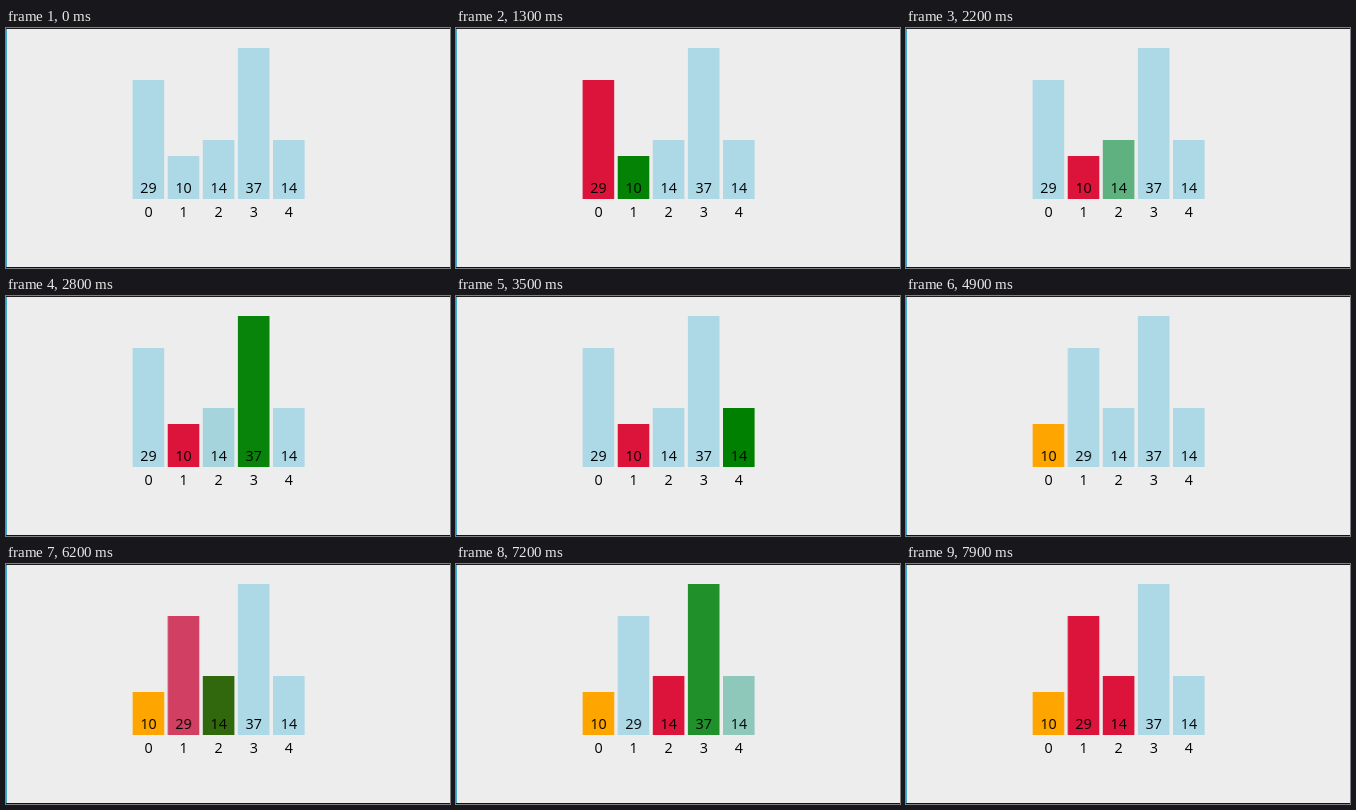
An HTML page for the animation above (8000 ms loop, 444x240 px).

```html
<!DOCTYPE html>
<html lang="en">
<head>
<meta charset="utf-8">
<title>Selection sort</title>
<style>
  :root {
    --idle: rgb(173, 216, 230);
    --min: rgb(220, 20, 60);
    --look: rgb(0, 128, 0);
    --done: rgb(255, 165, 0);
    --pitch: 35.1px;
  }
  html, body { margin: 0; width: 100%; height: 100%; overflow: hidden; background: #ededed; }
  svg { display: block; width: 444px; height: 240px; }
  text { font: 14.3px "Open Sans", "Noto Sans", sans-serif; text-anchor: middle; fill: #000; }
  .bar rect { fill: var(--idle); }
  .bar, .bar rect {
    animation: 8s cubic-bezier(.65, 0, .35, 1) infinite;
  }
  .a { transform: translateX(0); animation-name: move-a; }
  .b { transform: translateX(var(--pitch)); animation-name: move-b; }
  .c { transform: translateX(calc(2 * var(--pitch))); }
  .d { transform: translateX(calc(3 * var(--pitch))); }
  .e { transform: translateX(calc(4 * var(--pitch))); }
  .a rect { animation-name: tint-a; }
  .b rect { animation-name: tint-b; }
  .c rect { animation-name: tint-c; }
  .d rect { animation-name: tint-d; }
  .e rect { animation-name: tint-e; }

  /* One step every 6.295% of the loop, each transition 3.75% long */
  @keyframes move-a {
    0%, 50.89% { transform: translateX(0); }
    54.64%, 100% { transform: translateX(var(--pitch)); }
  }
  @keyframes move-b {
    0%, 50.89% { transform: translateX(var(--pitch)); }
    54.64%, 100% { transform: translateX(0); }
  }
  @keyframes tint-a {
    0%, 6.83% { fill: var(--idle); }
    10.58%, 19.41% { fill: var(--min); }
    23.16%, 44.6% { fill: var(--idle); }
    48.35%, 57.19% { fill: var(--min); }
    60.94%, 63.48% { fill: var(--idle); }
    67.23%, 76.07% { fill: var(--min); }
    79.82%, 94.96% { fill: var(--idle); }
    98.71%, 100% { fill: var(--min); }
  }
  @keyframes tint-b {
    0%, 13.12% { fill: var(--idle); }
    16.87%, 19.41% { fill: var(--look); }
    23.16%, 57.19% { fill: var(--min); }
    60.94%, 100% { fill: var(--done); }
  }
  @keyframes tint-c {
    0%, 25.71% { fill: var(--idle); }
    29.46%, 32.01% { fill: var(--look); }
    35.76%, 69.78% { fill: var(--idle); }
    73.53%, 76.07% { fill: var(--look); }
    79.82%, 100% { fill: var(--min); }
  }
  @keyframes tint-d {
    0%, 32.01% { fill: var(--idle); }
    35.76%, 38.3% { fill: var(--look); }
    42.05%, 82.37% { fill: var(--idle); }
    86.12%, 88.66% { fill: var(--look); }
    92.41%, 100% { fill: var(--idle); }
  }
  @keyframes tint-e {
    0%, 38.3% { fill: var(--idle); }
    42.05%, 44.6% { fill: var(--look); }
    48.35%, 88.66% { fill: var(--idle); }
    92.41%, 94.96% { fill: var(--look); }
    98.71%, 100% { fill: var(--idle); }
  }
</style>
</head>
<body>
<svg viewBox="0 0 444 240">
  <rect width="444" height="240" fill="#ededed"/>
  <rect width="1" height="240" fill="#45a9d0"/>
  <rect width="444" height="1" fill="#1c1c1c"/>
  <rect y="239" width="444" height="1" fill="#111"/>

  <g class="bar a"><rect x="126.6" y="52" width="31.6" height="119"/><text x="142.5" y="165">29</text></g>
  <g class="bar b"><rect x="126.6" y="128" width="31.6" height="43"/><text x="142.5" y="165">10</text></g>
  <g class="bar c"><rect x="126.6" y="112" width="31.6" height="59"/><text x="142.5" y="165">14</text></g>
  <g class="bar d"><rect x="126.6" y="20" width="31.6" height="151"/><text x="142.5" y="165">37</text></g>
  <g class="bar e"><rect x="126.6" y="112" width="31.6" height="59"/><text x="142.5" y="165">14</text></g>

  <text x="142.5" y="189">0</text>
  <text x="177.6" y="189">1</text>
  <text x="212.7" y="189">2</text>
  <text x="247.8" y="189">3</text>
  <text x="282.9" y="189">4</text>
</svg>
</body>
</html>
```
